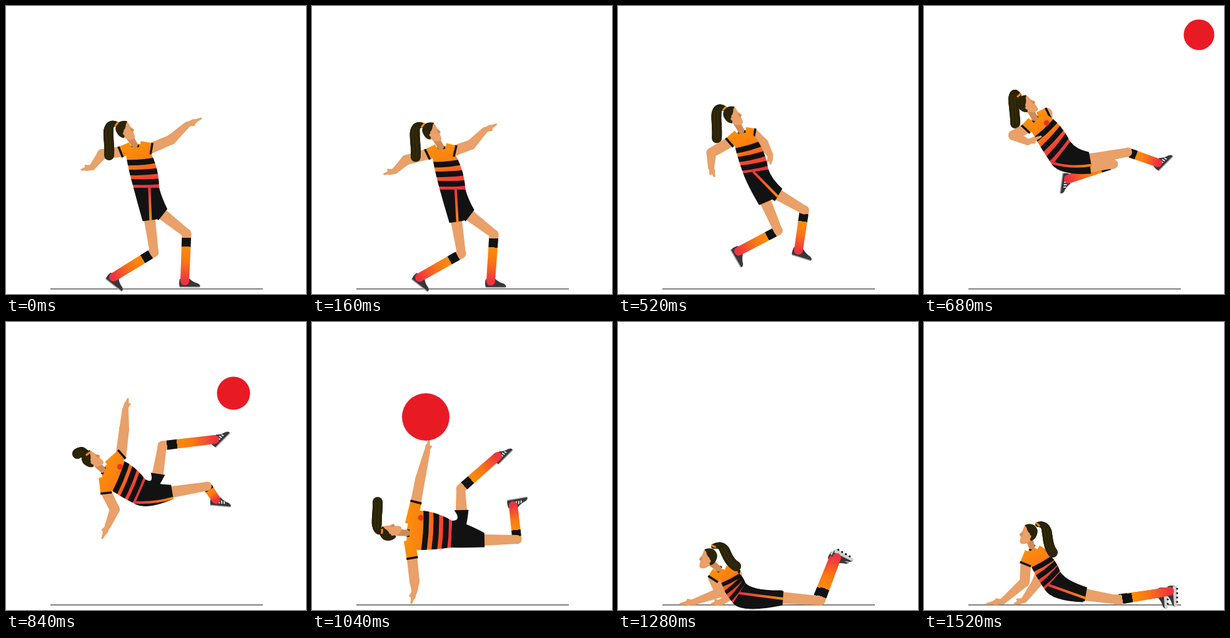
An HTML page with a canvas for the animation above (1560 ms loop, 480 by 461 pixels).

```html
<!DOCTYPE html>
<html lang="en">
<head>
<meta charset="utf-8">
<title>Overhead kick</title>
<style>
  html, body { margin: 0; width: 100%; height: 100%; overflow: hidden; background: #fff; }
  canvas { display: block; width: 480px; height: 461px; }
</style>
</head>
<body>
<canvas id="stage"></canvas>
<script>
const LOOP = 1560, STEP = 40;
const KEYS = [0, 360, 560, 680, 840, 1040, 1280, 1520];
const SKIN = '#e9a069', SHADE = '#d18a56', INK = '#121212', HAIR = '#2b2408';
const ORANGE = '#fb8d0a', RED = '#ef3340';

// One x, y pair (or one value) per key time
const body = {
  neck: [207,224, 207,231, 194,188, 178,181, 156,238, 154,338, 162,396, 173,361],
  hipB: [204,291, 205,297, 198,254, 205,254, 206,291, 222,361, 184,450, 193,428],
  hipA: [245,291, 246,297, 238,245, 234,217, 223,252, 224,318, 204,418, 218,400],
  trim: [.62, .62, .3, .06, .06, .02, .5, .25]
};
const armA = {
  shoulder: [231,228, 222,237, 214,190, 197,172, 184,213, 166,290, 190,405, 197,376],
  elbow: [264,214, 240,232, 222,212, 197,192, 189,172, 173,252, 181,436, 180,418],
  wrist: [290,190, 257,211, 215,230, 190,203, 191,140, 184,208, 166,448, 160,445],
  tip: [312,180, 270,203, 205,238, 183,210, 195,123, 187,190, 150,451, 145,451]
};
const armB = {
  shoulder: [185,233, 188,242, 176,206, 164,196, 160,272, 160,376, 153,410, 163,386],
  elbow: [154,237, 148,262, 150,222, 143,207, 174,300, 164,415, 163,433, 161,416],
  wrist: [138,258, 128,274, 160,243, 166,218, 163,326, 164,430, 122,448, 126,447],
  tip: [121,262, 111,281, 172,250, 187,209, 154,346, 159,450, 100,451, 101,451]
};
const legL = {
  hem: [230,343, 233,349, 238,298, 266,257, 243,243, 239,301, 262,441, 256,437],
  knee: [237,394, 242,400, 262,340, 303,253, 250,198, 238,267, 318,445, 306,444],
  ankle: [172,434, 172,435, 202,372, 231,277, 334,188, 297,215, 344,380, 378,434],
  toe: [38, 38, 70, 98, -45, -45, 30, 90], flipAt: 1160
};
const legR = {
  hem: [251,334, 255,338, 258,286, 266,245, 266,272, 276,349, 264,442, 259,436],
  knee: [289,364, 294,367, 300,308, 326,234, 322,263, 328,348, 324,446, 310,445],
  ankle: [286,440, 286,441, 290,368, 374,251, 336,284, 322,294, 350,377, 393,431],
  toe: [0, 0, 25, -45, 5, -10, 30, 90], flipAt: 960
};
const head = {
  at: [192,201, 194,207, 181,164, 166,159, 139,221, 127,336, 143,380, 166,341],
  tilt: [-25, -22, -30, -40, -48, -88, 15, 15],
  tail: [
    [177,189, 178,194, 167,150, 152,143, 131,211, 112,335, 153,359, 182,324],
    [156,184, 157,190, 147,140, 136,128, 122,207, 98,340, 176,352, 204,322],
    [167,215, 169,220, 156,172, 146,165, 118,208, 106,305, 168,378, 192,350],
    [165,239, 167,245, 154,196, 146,188, 114,211, 105,288, 189,391, 206,369]
  ]
};
// time, x, y, radius
const ballPath = [
  [600, 478, 22, 24], [680, 440, 46, 24.5], [840, 364, 114, 26.5], [900, 337, 138, 29],
  [960, 266, 128, 32], [1040, 182, 152, 38], [1120, 111, 202, 42], [1200, 50, 262, 47]
];

const canvas = document.getElementById('stage'), c = canvas.getContext('2d');
const dpr = window.devicePixelRatio || 1;
canvas.width = 480 * dpr;
canvas.height = 461 * dpr;
c.scale(dpr, dpr);

const lerp = (a, b, k) => a + (b - a) * k;
const mix = (p, q, k) => [lerp(p[0], q[0], k), lerp(p[1], q[1], k)];
const add = (p, d, k = 1) => [p[0] + d[0] * k, p[1] + d[1] * k];
const sub = (p, q) => [p[0] - q[0], p[1] - q[1]];
const unit = v => { const n = Math.hypot(...v) || 1; return [v[0] / n, v[1] / n]; };
const side = v => [-v[1], v[0]];
const turn = (a, b, k) => a + Math.atan2(Math.sin(b - a), Math.cos(b - a)) * k;
const rad = d => d * Math.PI / 180;

let now, seg, part;

function seek(t) {
  now = t;
  seg = 0;
  while (seg < KEYS.length - 2 && t >= KEYS[seg + 1]) seg++;
  const k = Math.min(1, (t - KEYS[seg]) / (KEYS[seg + 1] - KEYS[seg]));
  if (seg === 0 || seg === 6) part = k * k * (3 - 2 * k);
  else if (seg === 1) part = Math.pow(k, 1.7);
  else if (seg === 5) part = k * (1.4 - .4 * k);
  else part = k;
}
const key = (list, i) => [list[2 * i], list[2 * i + 1]];
const point = list => mix(key(list, seg), key(list, seg + 1), part);
const value = list => lerp(list[seg], list[seg + 1], part);
const heading = list => turn(rad(list[seg]), rad(list[seg + 1]), part);

// Joints swing around their parent, so bones keep their length
function chain(root, ...joints) {
  const out = [point(root)];
  let prev = root;
  for (const j of joints) {
    const v = sub(key(j, seg), key(prev, seg)), w = sub(key(j, seg + 1), key(prev, seg + 1));
    const a = turn(Math.atan2(v[1], v[0]), Math.atan2(w[1], w[0]), part);
    const r = lerp(Math.hypot(...v), Math.hypot(...w), part);
    out.push(add(out[out.length - 1], [Math.cos(a), Math.sin(a)], r));
    prev = j;
  }
  return out;
}

function disc(p, r, fill) {
  c.fillStyle = fill;
  c.beginPath();
  c.arc(p[0], p[1], r, 0, 7);
  c.fill();
}
function line(p, q, width, color) {
  c.strokeStyle = color;
  c.lineWidth = width;
  c.beginPath();
  c.moveTo(...p);
  c.lineTo(...q);
  c.stroke();
}
function shape(d, fill) {
  c.fillStyle = fill;
  c.fill(new Path2D(d));
}
function taper(p, q, w1, w2, fill) {
  const n = side(unit(sub(q, p)));
  disc(p, w1 / 2, fill);
  disc(q, w2 / 2, fill);
  c.beginPath();
  c.moveTo(...add(p, n, w1 / 2));
  c.lineTo(...add(q, n, w2 / 2));
  c.lineTo(...add(q, n, -w2 / 2));
  c.lineTo(...add(p, n, -w1 / 2));
  c.fill();
}
function ramp(p, q, ...stops) {
  const g = c.createLinearGradient(...p, ...q);
  for (const [k, color] of stops) g.addColorStop(k, color);
  return g;
}

function drawArm(arm, neck, cloth) {
  const [s, e, w, tip] = chain(arm.shoulder, arm.elbow, arm.wrist, arm.tip);
  const d = unit(sub(tip, w));
  taper(s, e, 17, 16, SKIN);
  taper(e, w, 16, 10, SKIN);
  taper(w, mix(w, tip, .5), 9, 8, SKIN);
  taper(mix(w, tip, .4), tip, 7, 3, SKIN);
  taper(w, add(add(w, d, 10), side(d), 5), 5, 3, SKIN);
  const out = unit(sub(s, neck));
  line(mix(neck, s, .3), s, 18, cloth);
  line(s, add(s, out, 3.5), 18.5, INK);
}

function drawShoe(p, angle, flip) {
  c.save();
  c.translate(...p);
  c.rotate(angle);
  c.scale(1, flip);
  shape('M-8-3L7-4Q13 2 21 4Q26 7 24 10L-8 10Q-10 3-8-3Z', '#38383b');
  if (flip < 0 && now > 1160) {
    shape('M-8 5L23 7Q26 9 24 12L-8 12Z', '#d3d3d3');
    for (let x = -4; x < 24; x += 7) disc([x, 12], 1.6, INK);
  } else {
    line([-8, 10], [24, 10], 1.6, '#a9a9ab');
  }
  if (now > 600 && now < 1160)
    for (let i = 0; i < 3; i++) line([5 + i * 4, 0 + i], [6 + i * 4, 6], 1.7, '#fff');
  c.restore();
}

function drawLeg(leg, hips) {
  const [hem, knee, ankle] = chain(leg.hem, leg.knee, leg.ankle);
  const d = unit(sub(knee, hem)), n = side(d);
  drawShoe(ankle, heading(leg.toe), now < leg.flipAt ? 1 : -1);
  taper(knee, ankle, 15, 14, ramp(knee, ankle, [0, SKIN], [.09, SKIN], [.09, INK],
    [.28, INK], [.28, ORANGE], [.6, '#fa7516'], [1, RED]));
  taper(hem, knee, 18, 14, SKIN);

  const { b, a, axis } = hips;
  c.fillStyle = INK;
  c.beginPath();
  c.moveTo(...b);
  c.quadraticCurveTo(...add(b, axis, 22), ...add(hem, n, 11.5));
  c.lineTo(...add(hem, n, -11.5));
  c.quadraticCurveTo(...add(a, axis, 16), ...a);
  c.fill();
  return { hem, n };
}

function drawTrim({ hem, n }, { b, a, axis }) {
  if (now >= 960 && now < 1160) return;
  const k = value(body.trim), from = mix(b, a, k), to = add(hem, n, 11 - 20 * k);
  c.strokeStyle = ramp(from, to, [0, RED], [1, ORANGE]);
  c.lineWidth = 4;
  c.beginPath();
  c.moveTo(...from);
  c.quadraticCurveTo(...add(mix(from, to, .4), axis, k < .2 ? 9 : 0), ...to);
  c.stroke();
}

function drawTorso(neck, hips, cloth) {
  const { b, a, axis } = hips;
  const sa = point(armA.shoulder), sb = point(armB.shoulder);
  const ta = mix(sa, neck, .3), tb = mix(sb, neck, .3), across = unit(sub(a, b));
  const size = Math.hypot(...sub(mix(a, b, .5), neck));
  c.save();
  c.beginPath();
  c.moveTo(...add(neck, axis, -3));
  c.lineTo(...add(ta, axis, -6));
  c.quadraticCurveTo(...add(mix(ta, a, .35), across, 13), ...a);
  c.lineTo(...b);
  c.quadraticCurveTo(...add(mix(tb, b, .4), across, -3), ...add(tb, axis, -6));
  c.closePath();
  c.fillStyle = cloth;
  c.fill();
  c.clip();
  for (const k of [.3, .56, .81]) {
    const p = mix(tb, b, k), q = mix(ta, a, k), d = unit(sub(q, p));
    c.strokeStyle = INK;
    c.lineWidth = size * .13;
    c.beginPath();
    c.moveTo(...add(p, d, -20));
    c.quadraticCurveTo(...add(mix(p, q, .5), axis, 6), ...add(q, d, 20));
    c.stroke();
  }
  c.restore();
  line(add(neck, across, -6), add(neck, across, 6), 4, INK);
  if (now >= 640 && now < 1160)
    disc(mix(mix(neck, sa, .65), mix(a, b, .5), .2), 4.5, '#eb3323');
}

function drawTail() {
  const [p, q, r, s] = head.tail.map(point);
  const at = k => mix(mix(mix(p, q, k), mix(q, r, k), k), mix(mix(q, r, k), mix(r, s, k), k), k);
  for (let i = 0; i <= 40; i++) disc(at(i / 40), 4 + 4 * Math.min(1, i / 18), HAIR);
  for (const off of [-3, 2]) {
    c.strokeStyle = '#40370f';
    c.lineWidth = 1;
    c.beginPath();
    for (let i = 12; i <= 40; i++) {
      const m = at(i / 40);
      c.lineTo(m[0] + off, m[1]);
    }
    c.stroke();
  }
  return p;
}

function drawHead(neck) {
  const at = point(head.at), band = drawTail();
  taper(at, add(neck, unit(sub(neck, at)), -2), 12, 10, SHADE);
  c.save();
  c.translate(...at);
  c.rotate(lerp(rad(head.tilt[seg]), rad(head.tilt[seg + 1]), part));
  c.scale(now < 1160 ? 1 : -1, 1);
  shape('M-8-13Q2-18 9-12L10-4L13 3L10 6L10 12Q9 17 4 16Q-4 14-7 6Z', SKIN);
  shape('M8-3L13 3L8 4Z', SHADE);
  shape('M9-14Q2-20-6-18Q-16-13-14-3Q-13 5-7 8Q-3 3-3-3Q2-5 5-11Z', HAIR);
  disc([-3, 2], 3, SKIN);
  c.restore();
  const d = side(unit(sub(band, at)));
  line(add(band, d, -4), add(band, d, 4), 3, ORANGE);
}

function drawBall() {
  if (now < ballPath[0][0] || now > 1200) return;
  let i = 0;
  while (i < ballPath.length - 2 && now >= ballPath[i + 1][0]) i++;
  const p = ballPath[i], q = ballPath[i + 1], k = (now - p[0]) / (q[0] - p[0]);
  disc([lerp(p[1], q[1], k), lerp(p[2], q[2], k)], lerp(p[3], q[3], k), '#e81b25');
}

function draw(t) {
  seek(t);
  c.fillStyle = '#fff';
  c.fillRect(0, 0, 480, 461);
  c.fillStyle = '#6c6c6c';
  c.fillRect(71, 452, 340, 1.7);

  const neck = point(body.neck), b = point(body.hipB), a = point(body.hipA);
  const waist = mix(a, b, .5), hips = { a, b, axis: unit(sub(waist, neck)) };
  const cloth = ramp(neck, waist, [0, ORANGE], [.4, '#fb7d14'], [.75, '#f4452f'], [1, RED]);
  const early = t < 520;
  const [backArm, frontArm] = early ? [armB, armA] : [armA, armB];
  const [backLeg, frontLeg] = early ? [legR, legL] : [legL, legR];

  drawArm(backArm, neck, cloth);
  drawLeg(backLeg, hips);
  drawTrim(drawLeg(frontLeg, hips), hips);
  drawTorso(neck, hips, cloth);
  drawHead(neck);
  drawArm(frontArm, neck, cloth);
  drawBall();
}

const start = performance.now();
function frame() {
  const t = Math.floor((performance.now() - start) % LOOP / STEP) * STEP;
  draw(t === 1320 ? 1280 : t);
  requestAnimationFrame(frame);
}
frame();
</script>
</body>
</html>
```
